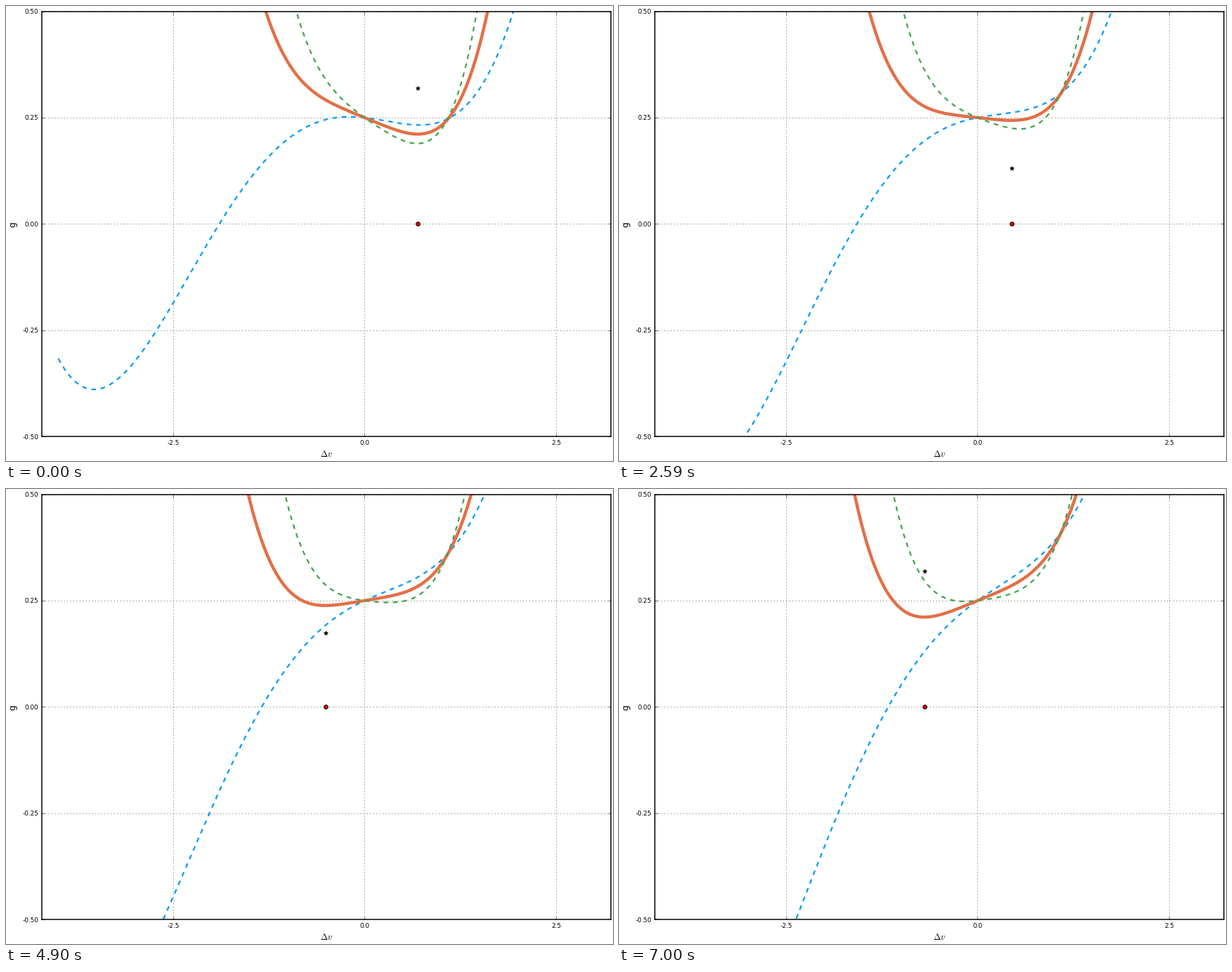
Animation of 864 by 648 pixels, one loop 7070 ms. Source, as a matplotlib script:

```python
import numpy as np
import matplotlib.pyplot as plt
from matplotlib.animation import FuncAnimation

W, H, DPI = 864, 648, 80
FRAMES, STEP_MS = 101, 70

plt.rcParams.update({
    "font.family": "DejaVu Sans",
    "mathtext.fontset": "cm",
    "axes.linewidth": 1.36,
    "lines.dash_capstyle": "butt",
    "lines.scale_dashes": False,
})

# Axes box and data scale, in pixels
LEFT, RIGHT, TOP, BOTTOM = 50.7, 860.8, 7.6, 613.1
ZERO_X, UNIT_X = 510.4, 109.0

H_MAX = 0.0745     # field at both ends of the sweep
QUARTIC = 0.0555
STAR_MAX = 0.32

BLUE, ORANGE, GREEN = "#009afa", "#e36f47", "#3ea44e"
x = np.linspace(-4, 4, 400)


def quartic(a, b, c, d):
    return 0.25 + a * x + b * x**2 + c * x**3 + d * x**4


fig = plt.figure(figsize=(W / DPI, H / DPI), dpi=DPI, facecolor="white")
ax = fig.add_axes([LEFT / W, 1 - BOTTOM / H,
                   (RIGHT - LEFT) / W, (BOTTOM - TOP) / H])

x_ticks = [-2.5, 0, 2.5]
y_ticks = [-0.5, -0.25, 0, 0.25, 0.5]
ax.set_xticks(x_ticks, [f"{v:.1f}" for v in x_ticks])
ax.set_yticks(y_ticks, [f"{v:.2f}" for v in y_ticks])
ax.tick_params(direction="in", length=4, width=0.5, pad=4, labelsize=8,
               top=True, right=True)
ax.set_axisbelow(True)
ax.grid(True, color="black", linewidth=0.5, linestyle=(0, (1, 3)))

fig.text(455.7 / W, 1 - 638 / H, r"$\Delta v$", fontsize=11,
         ha="center", va="center")
fig.text(10 / W, 1 - 310.7 / H, "g", fontsize=11, rotation=90,
         ha="center", va="center")

DASH = (0, (6, 6))
curves = [
    (quartic(0.0545, -0.0397, 0.0403, 0.01003), BLUE, 2, DASH),
    (quartic(0, 0, 0, QUARTIC), ORANGE, 4, "-"),
    (quartic(-0.055, 0.0405, -0.0475, 0.1088), GREEN, 2, DASH),
]
lines = [ax.plot(x, y, color=col, linewidth=lw, linestyle=ls)[0]
         for y, col, lw, ls in curves]


def marker(shape, color):
    return ax.scatter([0], [0], s=25, marker=shape, c=color, zorder=4,
                      edgecolors="black", linewidths=1, joinstyle="round")


dot = marker("o", "red")
star = marker("*", "black")

ax.set_xlim((LEFT - ZERO_X) / UNIT_X, (RIGHT - ZERO_X) / UNIT_X)
ax.set_ylim(-0.5, 0.5)


def update(i):
    s = 1 - 2 * i / (FRAMES - 1)
    h = H_MAX * s
    for line, (y, *_) in zip(lines, curves):
        line.set_ydata(y - h * x)
    # Minimum of QUARTIC * x^4 - h * x, and the curvature there
    x_min = np.cbrt(h / (4 * QUARTIC))
    dot.set_offsets([[x_min, 0]])
    star.set_offsets([[x_min, STAR_MAX * abs(s) ** (2 / 3)]])
    return [*lines, dot, star]


anim = FuncAnimation(fig, update, frames=FRAMES, interval=STEP_MS,
                     repeat=True, repeat_delay=0, blit=False)
plt.show()
```
